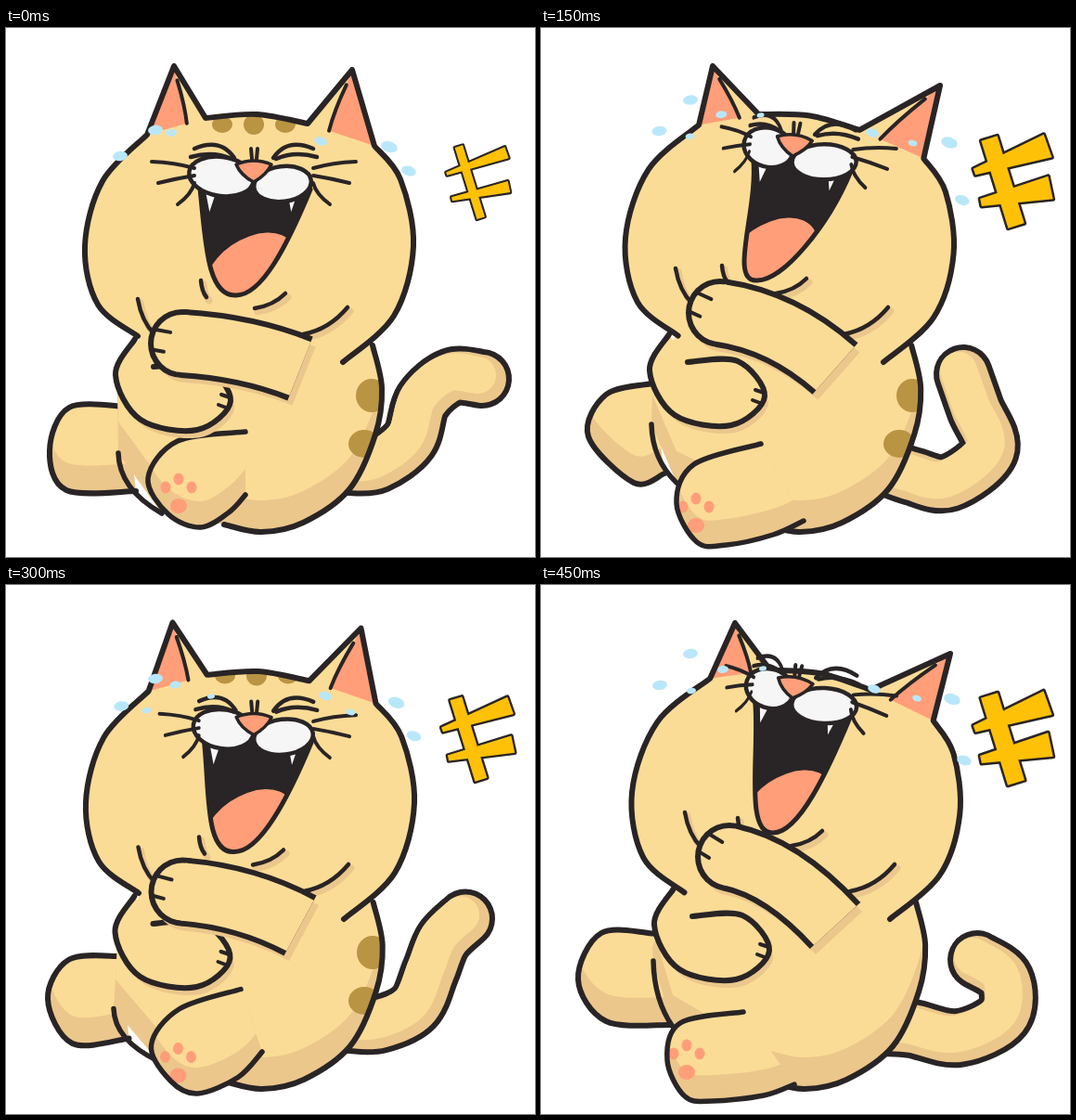
These frames come from a looping animation (570x570 px, 500 ms). An HTML page with a canvas:

```html
<!DOCTYPE html>
<html lang="en">
<head>
<meta charset="utf-8">
<title>Laughing cat</title>
<style>
html, body { margin: 0; width: 100%; height: 100%; overflow: hidden; background: #fff; }
#stage { position: relative; width: 570px; height: 570px; overflow: hidden; }
canvas { position: absolute; left: 0; top: 0; }
</style>
</head>
<body>
<div id="stage"><canvas id="strip" width="2850" height="570"></canvas></div>
<script>
const INK = '#292425', FUR = '#fbdc96', SHADE = '#ebc78c', PINK = '#ff9e78',
  SPOT = '#b99443', WHITE = '#f6f6f6', GOLD = '#ffc107', TEAR = '#b9e7fa';

// turn: how far the laugh has thrown the head back, 0 to 1
const sit = {
  turn: 0, tilt: 0, dx: 0, face: [267, 166], chin: [248, 288], tips: [181, 41, 373, 45],
  paw: [190, 340], low: [1, 0], hip: [121, 458], knee: [168, 523], pads: [186, 499],
  foot: [258, 435, 185, 445, 153, 485, 175, 524, 210, 538, 240, 522, 258, 503],
  leg: [130, 408, 68, 409, 47, 455, 65, 498, 140, 499],
  tail: [370, 472, 400, 470, 435, 444, 449, 402, 480, 376, 513, 378],
  mark: [0.82, 0.6]
};
const lift = {
  turn: 0.5, tilt: 0.01, dx: 2, face: [267, 157], chin: [244, 287], tips: [178, 40, 392, 48],
  paw: [191, 321], low: [0, 0], hip: [111, 455], knee: [160, 503], pads: [185, 526],
  foot: [248, 436, 188, 469, 160, 507, 180, 545, 203, 558, 260, 539, 294, 503],
  leg: [118, 392, 68, 398, 43, 437, 78, 490, 125, 478],
  tail: [370, 474, 405, 476, 445, 466, 466, 430, 462, 390, 477, 341],
  mark: [1.04, 1]
};
const lean = {
  turn: 0.9, tilt: 0.1, dx: 6, face: [271, 138], chin: [233, 272], tips: [185, 41, 430, 62],
  paw: [193, 307], low: [0, -5], hip: [119, 427], knee: [146, 490], pads: [167, 520],
  foot: [237, 448, 165, 470, 146, 512, 168, 554, 200, 557, 250, 546, 283, 531],
  leg: [120, 383, 70, 395, 51, 440, 100, 490, 133, 480],
  tail: [370, 472, 400, 483, 440, 490, 484, 455, 468, 410, 455, 373],
  mark: [1, 1]
};
const back = {
  turn: 1, tilt: 0.14, dx: 13, face: [271, 122], chin: [250, 267], tips: [209, 41, 441, 74],
  paw: [203, 293], low: [5, -8], hip: [121, 405], knee: [142, 476], pads: [157, 509],
  foot: [218, 460, 150, 472, 136, 512, 155, 551, 185, 556, 240, 550, 273, 538],
  leg: [125, 376, 65, 375, 40, 425, 70, 470, 140, 474],
  tail: [370, 476, 400, 478, 450, 488, 498, 465, 500, 425, 470, 404],
  mark: [1, 1.05]
};

// Tears: start x, y, flight x, y, size
const drops = [
  [161, 110, 0, -36, 8], [123, 138, 5, -30, 8], [178, 113, 18, -22, 6],
  [339, 122, 20, -10, 7], [413, 128, 30, -5, 9], [434, 154, 22, 35, 8],
  [215, 130, 24, -40, 4], [148, 142, 14, -28, 5], [360, 142, 45, -20, 5]
];

const ctx = strip.getContext('2d');
ctx.lineJoin = 'round';

const lerp = (a, b, t) => Array.isArray(a) ? a.map((v, i) => lerp(v, b[i], t)) : a + (b - a) * t;
const blend = (a, b, t) => Object.fromEntries(Object.keys(a).map(k => [k, lerp(a[k], b[k], t)]));
const pairs = flat => flat.flatMap((x, i) => i % 2 ? [] : [[x, flat[i + 1]]]);

// Adds a smooth run through the points to a path.
function run(path, p) {
  const at = i => p[Math.max(0, Math.min(p.length - 1, i))];
  path.lineTo(...p[0]);
  for (let i = 0; i < p.length - 1; i++) {
    const [a, b, c, d] = [at(i - 1), at(i), at(i + 1), at(i + 2)];
    path.bezierCurveTo(b[0] + (c[0] - a[0]) / 6, b[1] + (c[1] - a[1]) / 6,
      c[0] - (d[0] - b[0]) / 6, c[1] - (d[1] - b[1]) / 6, ...c);
  }
  return path;
}
const smooth = flat => run(new Path2D(), pairs(flat));

function oval(x, y, rx, ry = rx, turn = 0) {
  const path = new Path2D();
  path.ellipse(x, y, rx, ry, turn, 0, 7);
  return path;
}

function fill(path, color) {
  ctx.fillStyle = color;
  ctx.fill(path);
}

function stroke(path, width, color = INK, cap = 'round') {
  ctx.lineCap = cap;
  ctx.lineWidth = width;
  ctx.strokeStyle = color;
  ctx.stroke(path);
}

const line = (d, width = 4) => stroke(new Path2D(d), width);

function within(path, paint) {
  ctx.save();
  ctx.clip(path);
  paint();
  ctx.restore();
}

function moved(x, y, paint) {
  ctx.save();
  ctx.translate(x, y);
  paint();
  ctx.restore();
}

function inked(path, color, width) {
  fill(path, color);
  stroke(path, width);
}

// Fur with a band of shade along the bottom.
function furry(path, band) {
  fill(path, SHADE);
  within(path, () => moved(0, -band, () => fill(path, FUR)));
}

function drawTail(s) {
  const spine = smooth(s.tail);
  stroke(spine, 64);
  stroke(spine, 52, SHADE);
  moved(-5, -4, () => stroke(spine, 40, FUR));
}

function drawBody(s) {
  const leg = smooth(s.leg), foot = smooth(s.foot);
  furry(leg, 30);
  stroke(leg, 6);

  const side = [395, 342, 405, 388, 398, 438, 370, 497, 320, 533, 275, 543, 235, 535]
    .map((v, i) => i % 2 ? v : v + s.dx * 0.7);
  const torso = smooth(side);
  for (const p of [s.knee, s.hip, [120, 390], [150, 320]]) torso.lineTo(...p);
  furry(torso, 34);
  if (s.turn < 1) within(torso, () => {
    fill(oval(394 + s.dx, 396, 17, 18), SPOT);
    fill(oval(386, 448, 17, 15), SPOT);
  });
  stroke(smooth(side), 6);
  const [hx, hy] = s.hip, [kx, ky] = s.knee;
  line(`M${hx} ${hy}Q${hx + 1} ${lerp(hy, ky, 0.6)} ${kx} ${ky}`, 5.5);

  furry(foot, 28);
  within(foot, () => moved(...s.pads, () => {
    fill(oval(0, 16, 9, 8), PINK);
    for (const i of [-1, 0, 1]) fill(oval(14 * i, i ? -4 : -13, 5.5, 6.5), PINK);
  }));
  stroke(foot, 5.5);

  moved(...s.low, () => {
    const arm = smooth([138, 335, 117, 374, 144, 422, 205, 433, 241, 402, 212, 364, 158, 365]);
    within(torso, () => moved(4, 8, () => fill(arm, SHADE)));
    inked(arm, FUR, 6);
    line('M231 395l9 3M228 406l8 3');
  });
}

function drawHead(s) {
  // The crown rocks with the laugh while the jaw stays put.
  const bend = ([x, y]) => {
    const a = s.tilt * Math.max(0, Math.min(1, (340 - y) / 220));
    const [u, v] = [x - 262, y - 230];
    return [262 + s.dx + u * Math.cos(a) - v * Math.sin(a), 230 + u * Math.sin(a) + v * Math.cos(a)];
  };
  const bent = flat => pairs(flat).map(bend);
  const right = bent([363, 360, 418, 310, 439, 235, 425, 163, 397, 127]);
  const top = bent([325, 103, 270, 93, 215, 97]);
  const left = bent([152, 115, 104, 165, 85, 235, 99, 298, 142, 332]);
  const [tipL, tipR] = pairs(s.tips);

  const head = run(new Path2D(), right);
  head.lineTo(...tipR);
  run(head, top);
  head.lineTo(...tipL);
  run(head, left);
  fill(head, FUR);
  within(head, () => {
    for (const i of [-1, 0, 1])
      fill(oval(267 + 34 * i + 12 * s.turn, 104 - 26 * s.turn, 11, i ? 9 : 11), SPOT);
    for (const [tip, outer, inner] of [[tipL, left[0], top[2]], [tipR, right[4], top[0]]]) {
      const fold = lerp(outer, inner, 0.68), from = lerp(tip, fold, 0.25);
      const mid = lerp(lerp(tip, fold, 0.65), inner, 0.1);
      fill(new Path2D(`M${tip}L${outer}L${fold}Q${mid} ${from}Z`), PINK);
      line(`M${from}Q${mid} ${fold}`);
    }
  });
  stroke(head, 6);

  const [px, py] = s.paw, [cx, cy] = s.chin;
  const creases = new Path2D(`M${px - 48} ${py - 48}q4 24 18 38M${320 + s.dx} 330q28 -5 48 -29
    M${cx - 38} ${cy - 16}q1 12 6 18M${cx + 20} ${cy + 14}q20 -3 33 -16`);
  moved(3, 4, () => stroke(creases, 7, SHADE));
  stroke(creases, 4.5);
}

function drawArm(s) {
  const [px, py] = s.paw, drop = 367 - py;
  const arm = new Path2D(`M${px} ${py}Q260 ${py + drop * 0.16} 317 367`);
  const sausage = (radius, color) => {
    stroke(arm, radius * 2, color, 'butt');
    fill(oval(px, py, radius), color);
  };
  moved(4, 8, () => sausage(34, SHADE));
  sausage(37, INK);
  sausage(31, FUR);
  moved(px, py, () => {
    ctx.rotate(Math.atan2(drop, 317 - px) - 0.2);
    line('M-30 -15l17 3M-31 7l11 2');
  });
}

function drawFace(s) {
  const lobeL = 35 - 9 * s.turn, lobeR = 31 + 4 * s.turn;
  const [cx, cy] = s.chin, [fx, fy] = s.face, roll = s.tilt * 1.25;
  const place = (x, y) => [fx + x * Math.cos(roll) - y * Math.sin(roll),
    fy + x * Math.sin(roll) + y * Math.cos(roll)];
  const [lx, ly] = place(12 - 2 * lobeL, 7), [rx, ry] = place(lobeR + 30, 8);

  const mouth = new Path2D(`M${lx} ${ly}C${lx + 6} ${ly + 55} ${cx - 32} ${cy + 2} ${cx} ${cy}
    C${cx + 28} ${cy} ${rx - 25} ${ry + 60} ${rx} ${ry}Z`);
  fill(mouth, INK);
  within(mouth, () => fill(oval(cx + 15, cy - 25, 55, 35, -0.6), PINK));
  stroke(mouth, 5);

  moved(fx, fy, () => {
    ctx.rotate(roll);
    for (const x of [17 - 2 * lobeL, lobeR + 4]) inked(new Path2D(`M${x} 10l5 26l8 -24z`), WHITE, 2);
    inked(oval(-lobeL, -6, lobeL, 21, 0.15), WHITE, 4.5);
    inked(oval(lobeR, 2, lobeR, 19, -0.13), WHITE, 4.5);
    inked(new Path2D('M-19 -19Q0 -27 19 -19Q14 -8 0 0Q-14 -7 -19 -19Z'), PINK, 3.5);
    line('M-3 -36l1 11M4 -36l-1 11');
    for (const side of [-1, 1]) {
      ctx.save();
      ctx.scale(side < 0 ? 0.3 * s.turn - 1 : 1, 1);
      line('M21 -26Q36 -48 64 -36M24 -25Q44 -34 68 -27', 4.5);
      for (let i = 0; i < 3; i++) {
        const y = 8 * i - 15, far = 110 - 7 * i * i;
        line(`M64 ${y}Q${far - 25 + 5 * i} ${y - 6 + 9 * i} ${far} ${23 * i - 22}`);
      }
      ctx.restore();
    }
  });
}

function drawMark([size, thick]) {
  const wedge = (x1, y1, w1, x2, y2, w2) => {
    const a = Math.atan2(y2 - y1, x2 - x1), nx = -Math.sin(a) * thick / 2, ny = Math.cos(a) * thick / 2;
    return new Path2D(`M${x1 + nx * w1} ${y1 + ny * w1}L${x2 + nx * w2} ${y2 + ny * w2}
      L${x2 - nx * w2} ${y2 - ny * w2}L${x1 - nx * w1} ${y1 - ny * w1}Z`);
  };
  const bars = [wedge(-27, -48, 18, 2, 46, 18), wedge(-43, -12, 7, 36, -40, 26), wedge(-36, 21, 8, 39, 5, 25)];
  moved(510, 167, () => {
    ctx.scale(size, size);
    bars.forEach(bar => stroke(bar, 5));
    bars.forEach(bar => fill(bar, GOLD));
  });
}

function draw(s) {
  drawTail(s);
  drawBody(s);
  drawHead(s);
  drawArm(s);
  drawFace(s);
  drawMark(s.mark);
  for (const [x, y, vx, vy, r] of drops.slice(0, s.turn ? 9 : 6))
    fill(oval(x + vx * s.turn, y + vy * s.turn, r, r * 0.65, x < 270 ? -0.1 : 0.3), TEAR);
}

[sit, blend(sit, lift, 0.5), lift, lean, back].forEach((pose, i) => {
  ctx.setTransform(1, 0, 0, 1, 570 * i, 0);
  draw(pose);
});

strip.animate(
  { transform: ['translateX(0)', 'translateX(-2850px)'] },
  { duration: 250, easing: 'steps(5)', iterations: Infinity }
);
</script>
</body>
</html>
```
